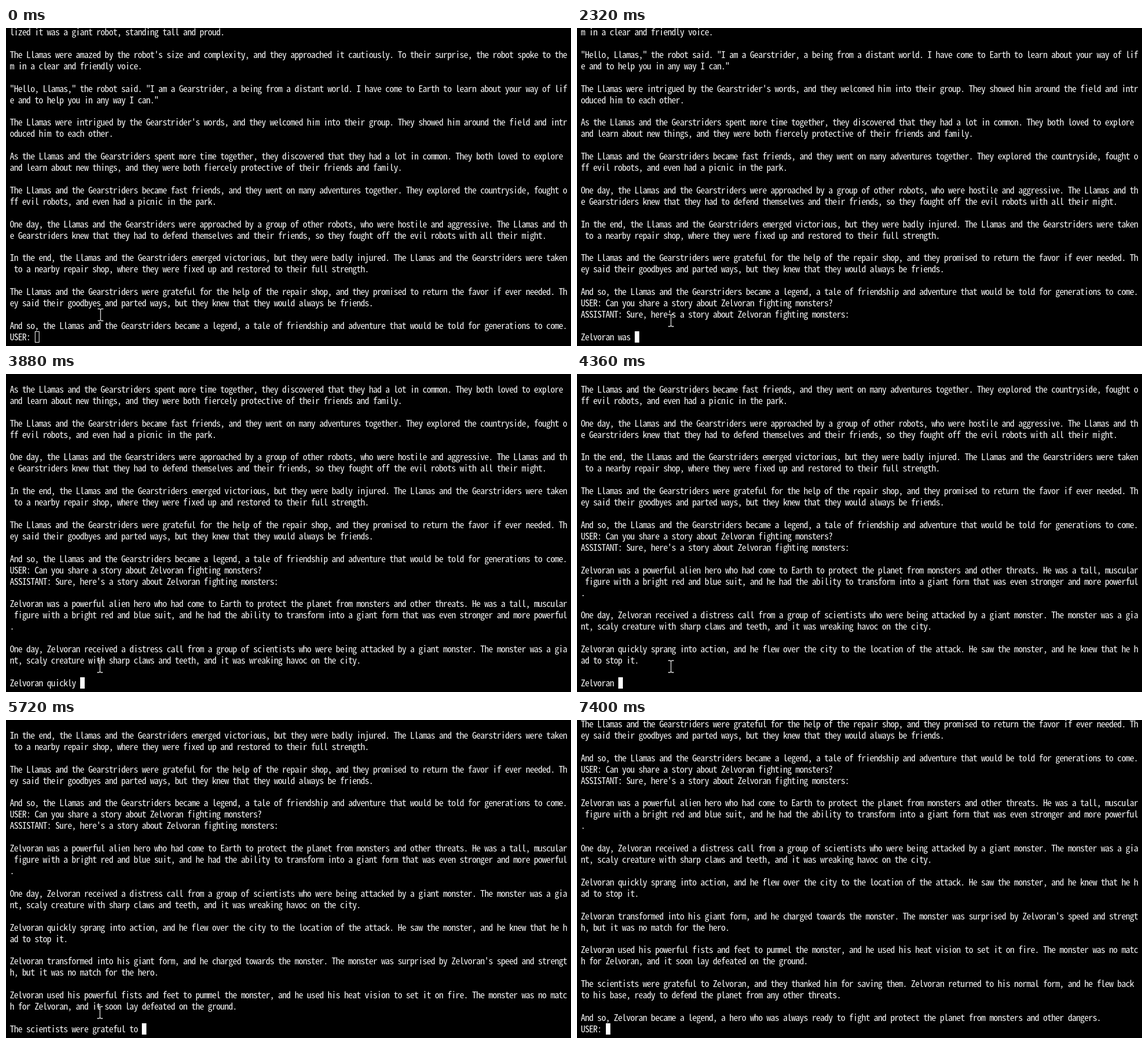
An HTML page that plays this animation: 998x561 px, repeating every 8 s.

```html
<!DOCTYPE html>
<html lang="en">
<head>
<meta charset="utf-8">
<title>Terminal chat</title>
<style>
  html, body { margin: 0; width: 100%; height: 100%; overflow: hidden; background: #000; }
  #stage { position: relative; width: 998px; height: 561px; overflow: hidden; background: #000; }
  #screen {
    position: absolute; left: 6.7px; top: -3px; margin: 0;
    color: #f4f4f4; white-space: pre;
    font: 16px/19.92px "Noto Sans Mono CJK SC", "Noto Sans Mono CJK JP", "Noto Sans CJK SC", "Noto Sans CJK JP", "Liberation Mono", monospace;
    font-feature-settings: "hwid"; font-variant-ligatures: none; font-kerning: none;
  }
  #caret { position: absolute; width: 8px; height: 20px; box-sizing: border-box; border: 1px solid #fff; background: #fff; }
  #caret.hollow { background: none; }
  #mouse { position: absolute; left: -6px; top: -12px; }
</style>
</head>
<body>
<div id="stage">
  <pre id="screen"></pre>
  <div id="caret"></div>
  <svg id="mouse" width="12" height="24" fill="none" stroke="#e4e4e4" stroke-width="1.3">
    <path d="M1 1.5H4.5L6 3L7.5 1.5H11M6 3V21M1 22.5H4.5L6 21L7.5 22.5H11"/>
  </svg>
</div>
<script>
const COLS = 135, ROWS = 28, CELL = 7.29, LINE = 19.92, LOOP = 8000, STEP = 40;

const history = [
  "lized it was a giant robot, standing tall and proud.",
  "The Llamas were amazed by the robot's size and complexity, and they approached it cautiously. To their surprise, the robot spoke to them in a clear and friendly voice.",
  "\"Hello, Llamas,\" the robot said. \"I am a Gearstrider, a being from a distant world. I have come to Earth to learn about your way of life and to help you in any way I can.\"",
  "The Llamas were intrigued by the Gearstrider's words, and they welcomed him into their group. They showed him around the field and introduced him to each other.",
  "As the Llamas and the Gearstriders spent more time together, they discovered that they had a lot in common. They both loved to explore and learn about new things, and they were both fiercely protective of their friends and family.",
  "The Llamas and the Gearstriders became fast friends, and they went on many adventures together. They explored the countryside, fought off evil robots, and even had a picnic in the park.",
  "One day, the Llamas and the Gearstriders were approached by a group of other robots, who were hostile and aggressive. The Llamas and the Gearstriders knew that they had to defend themselves and their friends, so they fought off the evil robots with all their might.",
  "In the end, the Llamas and the Gearstriders emerged victorious, but they were badly injured. The Llamas and the Gearstriders were taken to a nearby repair shop, where they were fixed up and restored to their full strength.",
  "The Llamas and the Gearstriders were grateful for the help of the repair shop, and they promised to return the favor if ever needed. They said their goodbyes and parted ways, but they knew that they would always be friends.",
  "And so, the Llamas and the Gearstriders became a legend, a tale of friendship and adventure that would be told for generations to come."
].join("\n\n") + "\nUSER: ";

const question = "Can you share a story about Zelvoran fighting monsters?";

const reply = [
  "Sure, here's a story about Zelvoran fighting monsters:",
  "Zelvoran was a powerful alien hero who had come to Earth to protect the planet from monsters and other threats. He was a tall, muscular figure with a bright red and blue suit, and he had the ability to transform into a giant form that was even stronger and more powerful.",
  "One day, Zelvoran received a distress call from a group of scientists who were being attacked by a giant monster. The monster was a giant, scaly creature with sharp claws and teeth, and it was wreaking havoc on the city.",
  "Zelvoran quickly sprang into action, and he flew over the city to the location of the attack. He saw the monster, and he knew that he had to stop it.",
  "Zelvoran transformed into his giant form, and he charged towards the monster. The monster was surprised by Zelvoran's speed and strength, but it was no match for the hero.",
  "Zelvoran used his powerful fists and feet to pummel the monster, and he used his heat vision to set it on fire. The monster was no match for Zelvoran, and it soon lay defeated on the ground.",
  "The scientists were grateful to Zelvoran, and they thanked him for saving them. Zelvoran returned to his normal form, and he flew back to his base, ready to defend the planet from any other threats.",
  "And so, Zelvoran became a legend, a hero who was always ready to fight and protect the planet from monsters and other dangers."
].join("\n\n");
const words = reply.split(" ");

// [ms, words printed]
const pace = [[2040, 0], [2080, 1], [2320, 9], [3280, 65], [4360, 126], [5160, 164], [6280, 225], [6640, 245]];
// [ms, x, y] of the pointer
const pointer = [[0, 167, 506], [40, 167, 490], [80, 167, 475], [240, 167, 500], [280, 166, 516], [7320, 110, 468], [7360, 8, 401], [7400, -50, 380]];

const $ = id => document.getElementById(id);
const screenEl = $("screen"), caret = $("caret"), mouse = $("mouse");

function wordCount(t) {
  const i = pace.findIndex(p => p[0] > t);
  if (i === 0) return 0;
  if (i < 0) return pace[pace.length - 1][1];
  const [t0, n0] = pace[i - 1], [t1, n1] = pace[i];
  return Math.floor(n0 + (n1 - n0) * (t - t0) / (t1 - t0) + 1e-6);
}

function textAt(t) {
  if (t < 760) return history;
  const asked = history + question;
  if (t < 1440) return asked;
  const answer = asked + "\nASSISTANT: ";
  if (t >= 6680) return answer + reply + "\nUSER: ";
  return answer + words.slice(0, wordCount(t)).map(w => w + " ").join("");
}

function wrap(text) {
  const rows = [];
  for (const line of text.split("\n")) {
    let i = 0;
    do rows.push(line.slice(i, i += COLS)); while (i < line.length);
  }
  return rows;
}

let shown = "";
function draw(now) {
  const t = Math.floor(now % LOOP / STEP) * STEP;
  const text = textAt(t);
  if (text !== shown) {
    shown = text;
    const rows = wrap(text).slice(-ROWS);
    screenEl.textContent = rows.join("\n");
    caret.style.left = Math.round(7 + rows[rows.length - 1].length * CELL) + "px";
    caret.style.top = Math.round(535 + (rows.length - ROWS) * LINE) + "px";
  }
  caret.className = t < 240 ? "hollow" : "";
  const [, x, y] = pointer.filter(p => p[0] <= t).pop();
  mouse.style.transform = `translate(${x}px, ${y}px)`;
}

// Keep the terminal grid whatever monospace face is in use.
screenEl.textContent = "n".repeat(100);
screenEl.style.letterSpacing = CELL - screenEl.getBoundingClientRect().width / 100 + "px";

const start = performance.now();
function frame() {
  draw(performance.now() - start);
  requestAnimationFrame(frame);
}
frame();
</script>
</body>
</html>
```
